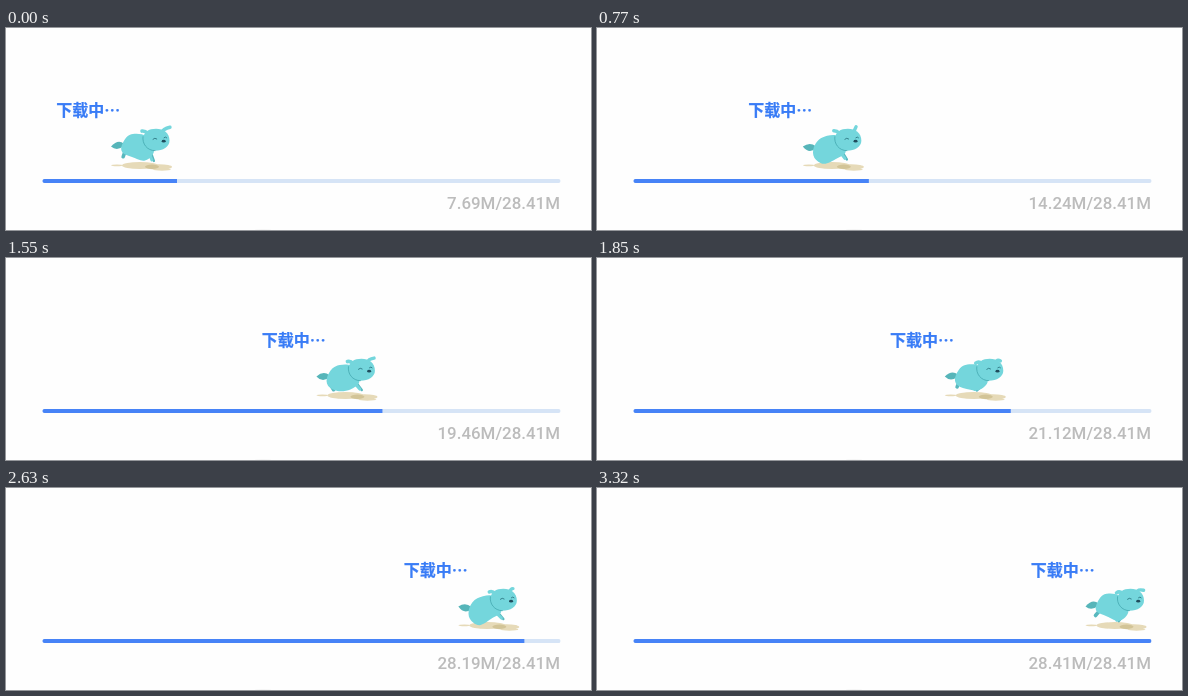
An HTML page that plays this animation: 585x202 px, repeating every 3420 ms.

```html
<!DOCTYPE html>
<html lang="zh-CN">
<head>
<meta charset="utf-8">
<style>
  html, body { margin: 0; width: 100%; height: 100%; overflow: hidden; background: #fefefe; }
  svg { display: block; width: 585px; height: 202px; }
  .label { font: 700 16px "Noto Sans CJK SC", "Noto Sans CJK", sans-serif; fill: #397cf6; stroke: #397cf6; stroke-width: .25; }
  .count { font: 500 16.9px Roboto, "Liberation Sans", sans-serif; fill: #bcbcbc; text-anchor: end; }
  .limb { fill: none; stroke-linecap: round; stroke-width: 3.6; stroke: #74d6dc; }
  .dark { stroke: #58b8be; }
  .line { fill: none; stroke: #45a9b0; stroke-width: .8; stroke-linecap: round; }
</style>
</head>
<body>
<svg viewBox="0 0 585 202">
  <defs><clipPath id="round"><rect x="36.5" y="151" width="518" height="4" rx="2"/></clipPath></defs>
  <g clip-path="url(#round)">
    <rect x="36" y="151" width="519" height="4" fill="#d6e4f6"/>
    <rect id="fill" x="36" y="151" height="4" fill="#4783f7"/>
  </g>
  <ellipse cx="257" cy="202" rx="8" ry="1" fill="#f5f5f5"/>
  <text id="count" class="count" x="554" y="181.3"></text>
  <g id="runner">
    <text class="label" x="-120.7" y="88.3">下载中…</text>
    <g fill="#e6dab8">
      <ellipse cx="-60" cy="137.3" rx="6" ry=".9"/>
      <ellipse cx="-37" cy="137.5" rx="18" ry="3.4"/>
      <ellipse cx="-18" cy="139" rx="13" ry="2.7"/>
      <ellipse cx="-15" cy="141.5" rx="9" ry="1.2"/>
      <ellipse cx="-25" cy="138.8" rx="7" ry="2.2" fill="#d2c497"/>
    </g>
    <path id="tail" fill="#56b5b9"/>
    <path id="hind" class="limb dark"/>
    <path id="foreFar" class="limb dark" style="stroke-width:2.4"/>
    <path id="fore" class="limb" style="stroke-width:3"/>
    <path id="earL" class="limb"/>
    <path id="body" fill="#74d6dc"/>
    <path id="earR" class="limb" style="stroke-width:3.4"/>
    <g id="head">
      <path d="M-13 0C-13 -8 -7 -11 0 -11C7.5 -11 13.5 -7 13.5 1C13.5 7 7 11 -1 11C-8 11 -13 7 -13 0Z" fill="#74d6dc"/>
      <path class="line" d="M-13 -3C-14 4 -9 11 -1 11"/>
      <path class="line" style="stroke:#256b78" d="M-3 -.5Q-1.2 -2.4 .8 -.8M8 -2Q9.5 -3.5 10.7 -2"/>
      <ellipse cx="7.7" cy="1.5" rx="2" ry="1.4" fill="#1f4c5c"/>
    </g>
  </g>
</svg>
<script>
const LOOP = 3420, STEP = 28.2, STRIDE = 17.5, TOTAL = 28.41;
const START_X = 171, END_X = 554.5, SPEED = 3.735; // pixels per step
const RUN_END = 3180, LAST_POSE = 3320;

// time, megabytes
const loaded = [[0, 7.69], [770, 14.24], [1250, 17.79], [1850, 21.12], [2340, 24.57], [2630, 28.19], [2715, TOTAL]];

const el = id => document.getElementById(id);
const setPath = (id, d) => el(id).setAttribute("d", d);

function track(keys, t) {
  const i = keys.findIndex(k => k[0] > t);
  if (i < 0) return keys[keys.length - 1][1];
  const [t0, v0] = keys[i - 1], [t1, v1] = keys[i];
  return v0 + (v1 - v0) * (t - t0) / (t1 - t0);
}

// Closed smooth curve through the points
function loopPath(pts) {
  const n = pts.length, pt = i => pts[(i + n) % n];
  let d = "M" + pt(0);
  for (let i = 0; i < n; i++) {
    const [a, b, c, e] = [pt(i - 1), pt(i), pt(i + 1), pt(i + 2)];
    const c1 = b.map((q, j) => q + (c[j] - a[j]) / 6);
    const c2 = c.map((q, j) => q - (e[j] - b[j]) / 6);
    d += `C${c1} ${c2} ${c}`;
  }
  return d + "Z";
}

// Gallop: every joint swings on a wave of the stride
function drawDog(phase) {
  const wave = (peak, turns = 1) => Math.cos(2 * Math.PI * turns * (phase - peak) / STRIDE);
  const sag = .3 + .75 * wave(6.9);      // tucked haunch
  const tuck = wave(6.3);                // hind leg
  const reach = 7 * wave(5) + 3.5 * wave(.3, 2);
  const flop = -1.2 * wave(5.5) - 1.7 * wave(.2, 2);
  const [hx, hy] = [-21, 111.7];

  const tailY = 117.5 + 2.5 * sag, rumpY = 126 + 5 * sag;
  setPath("body", loopPath([
    [-55, tailY], [-47, 107.5 + 3 * sag], [-31, 108], [-23, 123],
    [-32, 132 - 2 * sag], [-45, 131 + 6.5 * sag], [-54.5, rumpY]
  ]));
  setPath("tail", `M-53 ${tailY - 1}Q-59 ${tailY - 6} -66 118.5Q-60 ${tailY + 7} -53 ${tailY + 1}Z`);
  setPath("hind", `M-52 ${rumpY - 1}L${-50 + 6 * tuck} ${131 + 3.5 * tuck}`);

  const fx = -25 + reach, fy = 132.5 - 1.5 * sag;
  setPath("fore", `M-28 125L${fx - 2} ${fy - 1}`);
  setPath("foreFar", `M-26 125L${fx} ${fy}`);

  setPath("earL", `M${hx - 8} ${hy - 6}Q${hx - 11} ${hy - 9} -35 ${103.8 + flop * .6}`);
  setPath("earR", `M${hx + 6} ${hy - 7}Q${hx + 7} ${hy - 11} ${-10 - 3 * wave(8.5)} ${100.5 + flop}`);
  el("head").setAttribute("transform", `translate(${hx} ${hy})`);
}

function draw(t) {
  const step = Math.floor(Math.min(t, RUN_END) / STEP);
  const x = Math.min(START_X + SPEED * step, END_X);
  const size = Math.floor(track(loaded, t) * 100 + 1e-6) / 100;
  el("fill").setAttribute("width", x - 36);
  el("runner").setAttribute("transform", `translate(${x} 0)`);
  el("count").textContent = `${size.toFixed(2)}M/${TOTAL}M`;
  drawDog(t < LAST_POSE ? step % STRIDE : 15);
}

const start = performance.now();
function tick() {
  draw((performance.now() - start) % LOOP);
  requestAnimationFrame(tick);
}
tick();
</script>
</body>
</html>
```
